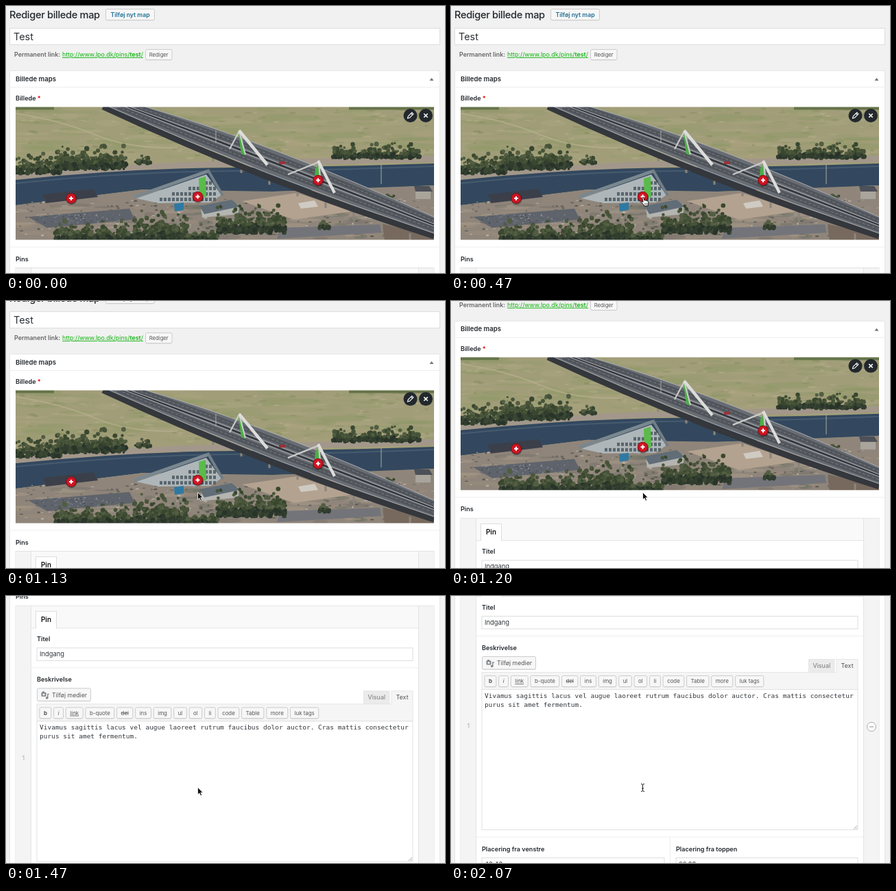
These frames come from a looping animation (640x390 px, 2.14 s). An HTML page:

```html
<!DOCTYPE html>
<html lang="da">
<head>
<meta charset="utf-8">
<title>Rediger billede map</title>
<style>
html, body { margin: 0; width: 100%; height: 100%; overflow: hidden; background: #f1f1f1; }
#stage { display: block; width: 640px; height: 390px; }
text { font-family: Inter, Roboto, sans-serif; white-space: pre; }
text.mono { font-family: "DejaVu Sans Mono", "Liberation Mono", monospace; }
</style>
</head>
<body>
<svg id="stage" viewBox="0 0 640 390">
  <filter id="soft" x="0" y="0" width="1" height="1"><feGaussianBlur stdDeviation=".45"/></filter>
  <g id="page"></g>
  <g id="arrow">
    <path d="M0 0V10.6L2.5 8.4L4.2 12.2L6.1 11.3L4.4 7.7H7.7Z" fill="#111" stroke="#fff" stroke-width=".8"/>
  </g>
  <g id="hand">
    <path d="M-.7 .8Q.5-.6 1.5.9L2.3 4.5Q3.4 3.5 4.3 4.7Q5.5 4 6.2 5.2Q7.7 4.8 8.1 6.4L8.3 9L7.3 12.6H2.3L.8 10.2L-2.1 7Q-2.3 5.5-.8 6L.5 7Z" fill="#fff" stroke="#111"/>
    <path d="M3.2 8.3V11M4.9 8.3V11M6.5 8.3V11" stroke="#111" stroke-width=".6"/>
  </g>
  <g id="beam" fill="none">
    <path d="M-2.5-5Q0-5 0-3.6V4.6Q0 6-2.5 6M2.5-5Q0-5 0-3.6M0 4.6Q0 6 2.5 6M-1.5 1.5H1.5" stroke="#222"/>
  </g>
</svg>
<script>
const LOOP = 2140, STEP = 200 / 3;
const INK = '#23282d', GREY = '#555';
const $ = id => document.getElementById(id);
const mix = (a, b, k) => a + (b - a) * k;

let seed = 7;
const rnd = (a = 0, b = 1) => {
  seed = (seed * 16807) % 2147483647;
  return +mix(a, b, seed / 2147483647).toFixed(1);
};
const pick = list => list[Math.floor(rnd(0, list.length - .1))];

const out = [];
const add = s => out.push(s);
const rect = (x, y, w, h, fill, stroke = 'none', r = 0) =>
  add(`<rect x="${x}" y="${y}" width="${w}" height="${h}" rx="${r}" fill="${fill}" stroke="${stroke}"/>`);
const text = (s, x, y, size, fill = INK, weight = 400, more = '') =>
  add(`<text x="${x}" y="${y}" font-size="${size}" fill="${fill}" font-weight="${weight}" ${more}>${s}</text>`);
const line = (d, stroke, width = 1, more = '') =>
  add(`<path d="${d}" fill="none" stroke="${stroke}" stroke-width="${width}" ${more}/>`);
const shape = (d, fill) => add(`<path d="${d}Z" fill="${fill}"/>`);
const disc = (x, y, r, fill, more = '') =>
  add(`<circle cx="${x}" cy="${y}" r="${r}" fill="${fill}" ${more}/>`);

// Foliage in a box: ragged crowns, dark below and lighter above
function trees(x, y, w, h) {
  for (let i = 0; i < w * h / 9; i++) {
    const u = rnd(0, w), v = Math.sqrt(rnd());
    const crown = h * .35 * Math.abs(Math.sin((x + u) / 9));
    const tones = v > .65 ? ['#28332a', '#313d2e', '#3a4733'] : ['#39472f', '#465338', '#525d42'];
    disc(x + u, (y + mix(crown, h, v)).toFixed(1), rnd(1.2, 3.6), pick(tones));
  }
}

// Flat flecks for grass, gravel and parked cars
function flecks(x, y, w, h, n, size, flat, tones, alpha) {
  for (let i = 0; i < n; i++)
    add(`<ellipse cx="${rnd(x, x + w)}" cy="${rnd(y, y + h)}" rx="${rnd(size / 3, size)}" ry="${rnd(size / 3, size) * flat}" fill="${pick(tones)}" opacity="${alpha}"/>`);
}

// One line along the deck; v runs from the near edge to the far edge
const deck = v => [[150, 147, 203, 147], [380, 250, 380, 198], [624, 332, 624, 308]]
  .map(([x, y, farX, farY]) => `${mix(x, farX, v)} ${mix(y, farY, v)}`);
const lane = v => { const [a, b, c] = deck(v); return `M${a}Q${b} ${c}`; };

function bridge() {
  for (let x = 302; x < 600; x += 41) line(`M${x} ${mix(213, 315, (x - 302) / 246)}v14`, '#8b857c', 3);
  line(lane(-.16), '#34373c', 9);
  const [a, b, c] = deck(1);
  shape(`${lane(0)}L${c}Q${b} ${a}`, '#686c73');
  for (const v of [.25, .75]) line(lane(v), '#50545b', 7);
  line(lane(.5), '#33363b', 2.5);
  for (const v of [0, .43, .57, 1]) line(lane(v), '#b4b6b8', .9);
  for (const v of [.25, .75]) line(lane(v), '#a4a7aa', .5, 'stroke-dasharray="4 3"');
  rect(398, 227, 9, 4, '#9d3039');
  shape('M339 188L343 188L349 218L343 216', '#4caf45');
  shape('M451 237L456 232L460 251L450 247', '#4caf45');
  line('M349 217L340 183L326 209', '#c9cbc9', 2.2);
  line('M340 182L381 232', '#dcddda', 4.5);
  line('M411 246L456 228L458 252', '#c9cbc9', 2.4);
  line('M455 226L479 273', '#dcddda', 4.2);
}

function buildings() {
  shape('M56 280L133 277V287L58 291', '#8d8379');
  shape('M54 275L128 267L134 279L58 288', '#3b3f4a');
  shape('M190 281L292 246L314 276L298 287L222 288', '#aeb6b9');
  for (let x = 224; x < 306; x += 6)
    for (let y = 283; y > 258 && y > 283 - (x - 215) * .33; y -= 8) rect(x, y - 3, 4, 5, '#59666d');
  line('M187 279L295 241', '#7a878f', 5);
  line('M294 239L316 277', '#727e86', 4);
  shape('M281 252L291 249L292 279L282 281', '#5abb4a');
  shape('M245 289L259 287V298L246 300', '#2e79a3');
  shape('M284 294L339 289V304L286 309', '#b4b5b1');
  shape('M282 292L329 283L341 293L289 304', '#616d77');
  shape('M426 288L450 284L455 293L430 296', '#cfcbc3');
  shape('M597 270H619V282H597', '#a9a59d');
  shape('M595 263H617L622 271H597', '#4d5058');
}

function photo() {
  add('<svg x="14" y="147.5" width="610" height="194" viewBox="14 147.5 610 194"><g filter="url(#soft)">');
  rect(14, 147, 610, 195, '#a09d78');
  flecks(14, 150, 610, 78, 170, 42, .13, ['#8a9463', '#b0a985', '#929a6b', '#a9a27e'], .35);
  flecks(14, 150, 610, 75, 160, 7, .25, ['#7c8858', '#bab18f'], .4);
  line('M14 157Q80 167 130 188T250 207', '#b8b08f', 2, 'opacity=".7"');
  line('M14 149H70M500 149H624', '#66734a', 5);

  // Banks, river and the built-up shore
  line('M14 250Q180 234 335 230T624 223', '#a2978a', 9);
  shape('M14 254Q180 237 330 236T624 230V262Q510 268 390 271T200 268L14 291', '#33485e');
  line('M14 259Q180 242 330 241T624 234', '#465b70', 2);
  shape('M14 291L200 268L390 271L624 262V342H14', '#8f857a');
  flecks(14, 290, 610, 50, 110, 24, .16, ['#aa9b8a', '#77716a', '#9b8d7d', '#6c7064'], .5);
  flecks(14, 282, 610, 58, 330, 3, .5, ['#c3bcb2', '#5a5853', '#47493f', '#a29a8e'], .7);
  trees(14, 213, 66, 31);
  trees(72, 202, 104, 36);
  trees(188, 219, 23, 11);
  trees(476, 199, 127, 23);

  shape('M32 308L180 296L188 312L60 324', '#5f636b');
  flecks(45, 304, 130, 14, 90, 2, .5, ['#3e424a', '#94989d', '#70757d'], .9);
  shape('M344 285L424 273L505 300L420 312', '#b3a28f');
  shape('M400 324L545 319L548 331L395 340', '#73747a');
  buildings();
  trees(72, 313, 110, 29);
  trees(184, 299, 80, 43);
  trees(264, 324, 46, 18);
  trees(308, 290, 100, 41);
  trees(456, 311, 16, 14);
  trees(555, 274, 14, 11);
  shape('M548 318L624 336V342H552', '#77695d');
  bridge();
  line('M306 200V182M547 232V260', '#c5c5bd', .8);
  add('</g></svg>');
}

function pin(x, y) {
  disc(x + .5, y + 1, 8.2, '#000', 'opacity=".35"');
  disc(x, y, 7.2, '#cf1422', 'stroke="#8d1019"');
  line(`M${x - 3} ${y}h6M${x} ${y - 3}v6`, '#fff', 2);
}

function button(s, x, y, w, h, size, base, fill = GREY, weight = 400, more = '') {
  rect(x, y + 1, w, h, '#ddd', 'none', 2);
  rect(x, y, w, h, '#f7f7f7', '#ccc', 2);
  text(s, x + w / 2, base, size, fill, weight, 'text-anchor="middle" ' + more);
}

const label = (s, x, y) => text(s, x, y, 9.1, INK, 600);

function input(s, x, y, w) {
  rect(x, y, w, 18.5, '#fff', '#ddd');
  text(s, x + 4, y + 12.3, 9.4, '#32373c');
}

function header() {
  text('Rediger billede map', 5, 17.5, 14.6, INK, 500, 'letter-spacing="-.33"');
  button('Tilføj nyt map', 145.5, 4.5, 71, 16, 8.7, 15.5, '#1f6f95', 600);
  rect(5.5, 32.5, 627, 24, '#fff', '#ddd');
  text('Test', 11, 49.5, 14.4, '#2b3035');
  text('Permanent link:', 12, 74, 8.9, '#666', 600);
  text('http://www.lpo.dk/pins/<tspan font-weight="600">test</tspan>/', 82, 74, 8.85, '#0eb40e', 400, 'text-decoration="underline"');
  button('Rediger', 203.5, 63.5, 38.5, 15, 7.7, 73.7);
  rect(5.5, 94.5, 627, 900, '#fff', '#e5e5e5');
  line('M5 118.5H633', '#eee');
  text('Billede maps', 14, 109.5, 9.6, INK, 600);
  shape('M617.5 109H623.5L620.5 105', '#72777c');
  label('Billede <tspan fill="#e00">*</tspan>', 14, 138);
}

function photoTools() {
  pin(95, 281);
  pin(279.5, 278.5);
  pin(455, 254.5);
  for (const x of [589.5, 612]) disc(x, 160, 10, INK);
  line('M585.5 164l.8-3 5.4-5.4 2.2 2.2-5.4 5.4zM590.3 157l2.2 2.2', '#fff', 1.1);
  line('M609.3 157.3l5.4 5.4M614.7 157.3l-5.4 5.4', '#fff', 1.6);
}

function toolbar() {
  const looks = { i: 'font-style="italic"', link: 'text-decoration="underline"', del: 'text-decoration="line-through"' };
  const pen = document.createElement('canvas').getContext('2d');
  pen.font = '7.9px Inter, Roboto, sans-serif';
  let x = 49;
  for (const name of 'b,i,link,b-quote,del,ins,img,ul,ol,li,code,Table,more,luk tags'.split(',')) {
    const w = pen.measureText(name).width + 12;
    button(name, x, 531, w, 16, 7.9, 541.8, GREY, name === 'b' ? 700 : 400, looks[name]);
    x += w + 3.8;
  }
}

function editor() {
  label('Beskrivelse', 45, 493.5);
  button('', 45.5, 503, 78, 18.5, 8.7, 515.7);
  text('Tilføj medier', 67, 515.8, 8.7, GREY);
  rect(51.5, 509, 7, 6, '#82878c', 'none', 1);
  rect(53, 507.5, 3, 2, '#82878c');
  disc(55, 512, 1.6, '#f7f7f7');
  line('M60.8 517V511.5H62.8', '#82878c', 1.4);
  disc(59.7, 517, 1.8, '#82878c');

  rect(521.5, 507, 37.5, 19, '#ebebeb', '#e5e5e5');
  text('Visual', 540.3, 519.3, 9, '#777', 400, 'text-anchor="middle"');
  rect(45, 526, 548, 25, '#f5f5f5', '#e5e5e5');
  rect(562, 507, 31, 19, '#f5f5f5', '#e5e5e5');
  rect(562.5, 525, 30, 3, '#f5f5f5');
  text('Text', 577.5, 519.3, 9, GREY, 400, 'text-anchor="middle"');
  toolbar();

  rect(45, 551, 548, 205, '#fff', '#e1e1e1');
  ['Vivamus sagittis lacus vel augue laoreet rutrum faucibus dolor auctor. Cras mattis consectetur',
    'purus sit amet fermentum.'].forEach((s, i) =>
    text(s, 49, 563.3 + 13 * i, 9.5, '#32373c', 400, 'class="mono"'));
  line('M587 755l5-5M590 755l2-2', '#888', .8);
}

function fields() {
  line('M6 352H632', '#eee');
  label('Pins', 14, 372.5);
  rect(14, 382.5, 610, 600, '#fff', '#e1e1e1');
  for (const x of [14.5, 601.5]) rect(x, 383, 22, 600, '#f4f4f4');
  rect(37, 383, 564, 32, '#f9f9f9');
  line('M36.5 383V990M601.5 383V990M37 415H601', '#e4e4e4');
  rect(43.5, 390.5, 30, 24.5, '#fff', '#ddd');
  rect(44, 414, 29, 3, '#fff');
  text('Pin', 51, 406, 9.8, '#111', 600);
  text('1', 25.3, 607.7, 9, '#aaa', 400, 'text-anchor="middle"');

  label('Titel', 45, 434);
  input('Indgang', 45, 444, 548);
  line('M37 473H601', '#eee');
  editor();

  line('M37 766.5H601M319.5 767V860', '#eee');
  label('Placering fra venstre', 45, 787);
  label('Placering fra toppen', 328, 787);
  input('43.43', 45, 797, 266);
  input('66.88', 328, 797, 265);

  add('<g id="minus">');
  disc(613, 605.5, 6.5, '#fff', 'stroke="#aaa"');
  line('M610 605.5h6', '#999', 1.2);
  add('</g>');
}

header();
photo();
photoTools();
fields();
$('page').innerHTML = out.join('');

// Steps at which scrolling starts, ends, and the row reacts to the pointer
const GO = 16, STOP = 24, HOVER = 25;

function scrollAt(n) {
  const k = Math.min(1, Math.max(0, (n - GO) / (STOP - GO)));
  return 414.5 * (1 - (1 - k * k) ** 2.65);
}

function pointer(n) {
  const left = (1 - Math.min(1, n / 6)) ** 2;
  return [279.5 + 45 * left, 279.5 + 80 * left];
}

function draw(now) {
  const n = Math.floor((now % LOOP + 4) / STEP);
  const [x, y] = pointer(n);
  const kind = n < 1 ? '' : n >= HOVER ? 'beam' : n > GO || y > 286 ? 'arrow' : 'hand';
  $('page').setAttribute('transform', `translate(0 ${-scrollAt(n)})`);
  for (const id of ['arrow', 'hand', 'beam']) {
    $(id).setAttribute('transform', `translate(${x} ${y})`);
    $(id).style.display = id === kind ? '' : 'none';
  }
  $('minus').style.display = n >= HOVER ? '' : 'none';
}

const start = performance.now();
function tick() {
  draw(performance.now() - start);
  requestAnimationFrame(tick);
}
tick();
</script>
</body>
</html>
```
